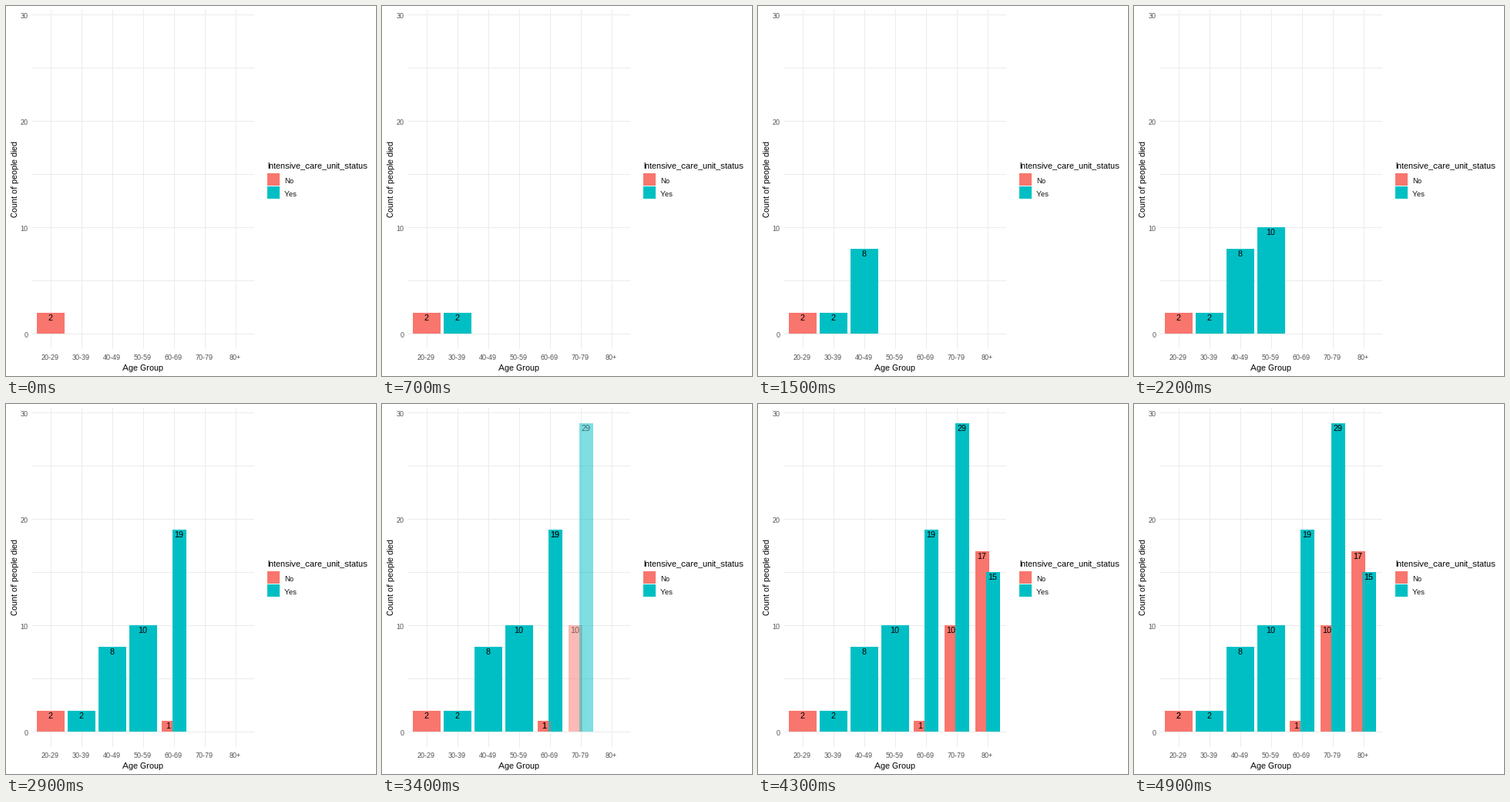
Animation, 480 px wide and 480 px high, one loop 10000 ms. Source, as a matplotlib script:

```python
import matplotlib.pyplot as plt
import numpy as np
from matplotlib.animation import FuncAnimation
from matplotlib.patches import Rectangle

SIZE = 480
RED, TEAL, GRID, GREY = "#F8766D", "#00BFC4", "#EBEBEB", "#4D4D4D"
AGES = ["20-29", "30-39", "40-49", "50-59", "60-69", "70-79", "80+"]
COUNTS = [(2, None), (None, 2), (None, 8), (None, 10), (1, 19), (10, 29), (17, 15)]

# First frame and step count of the fade that follows each age group
FADES = [(3, 5), (11, 5), (19, 4), (26, 4), (33, 4), (40, 4), (47, 4)]
FRAMES, LAST = 100, 49

# Full pixel hinting, whole-pixel advances and no kerning
plt.rcParams.update({
    "font.family": "Liberation Sans",
    "text.hinting": "native",
    "text.hinting_factor": 1,
    "text.kerning_factor": 6,
})
fig = plt.figure(figsize=(SIZE / 72, SIZE / 72), dpi=72, facecolor="white")
ax = fig.add_axes([0, 0, 1, 1])
ax.set_xlim(0, SIZE)
ax.set_ylim(SIZE, 0)
ax.axis("off")


def x_pos(i):
    return 58 + 40 * i


def y_pos(v):
    return 425.2 - 13.79 * v


def box(x0, y0, x1, y1, color, z=1):
    patch = Rectangle((x0, y0), x1 - x0, y1 - y0, facecolor=color,
                      linewidth=0, antialiased=False, zorder=z)
    return ax.add_patch(patch)


def label(x, y, s, size=11, color="black", ha="center", z=5, **kw):
    return ax.text(x, y, s, fontsize=size, color=color, ha=ha,
                   va="baseline", zorder=z, **kw)


def draw_group(i, z):
    """Bars and value labels of one age group."""
    parts = []
    pair = [(v, c) for v, c in zip(COUNTS[i], (RED, TEAL)) if v is not None]
    half = 18 / len(pair)
    shifts = (-7, 7) if len(pair) == 2 else (0,)
    for (v, color), dx in zip(pair, shifts):
        x, top = x_pos(i) + dx, round(y_pos(v))
        parts.append(box(x - half, top, x + half, 425, color, z))
        parts.append(label(x - 0.6, top + 10, str(v), z=z + 3))
    return parts


def draw_frame():
    for v in range(0, 31, 5):
        row = int(y_pos(v))
        box(34, row, 322, row + 1, GRID)
        if v % 10 == 0:
            label(28.6, row + 5, str(v), 9, GREY, "right")
    for i, age in enumerate(AGES):
        x = x_pos(i)
        box(x, 5, x + 1, 445, GRID)
        label(x - 0.6, 459, age, 9, GREY)
    label(177.6, 473, "Age Group")
    label(15, 225, "Count of people died", rotation=90, rotation_mode="anchor")
    label(339, 210, "Intensive_care_unit_status", ha="left")
    for y, color, name in ((217, RED, "No"), (234, TEAL, "Yes")):
        box(339, y, 355, y + 16, color)
        label(361, y + 13, name, 9, ha="left")


draw_frame()
past = [draw_group(i, 2) for i in range(len(AGES))]
live = [draw_group(i, 3) for i in range(len(AGES))]


def update(n):
    n = min(n, LAST)
    done = [float(np.clip((n - s + 1) / steps, 0, 1)) for s, steps in FADES]
    for i, (start, _) in enumerate(FADES):
        # Each group fades in, then fades out over its own solid trace
        if i == 0:
            alpha = 1 - done[0] + done[-1]
        else:
            alpha = done[i - 1] - done[i]
        for part in live[i]:
            part.set_alpha(min(max(alpha, 0), 1))
            part.set_visible(alpha > 0.001)
        for part in past[i]:
            part.set_visible(n >= start)
    return [p for group in past + live for p in group]


anim = FuncAnimation(fig, update, frames=FRAMES, interval=100,
                     init_func=lambda: update(0), repeat=True,
                     repeat_delay=0, blit=False)
plt.show()
```
